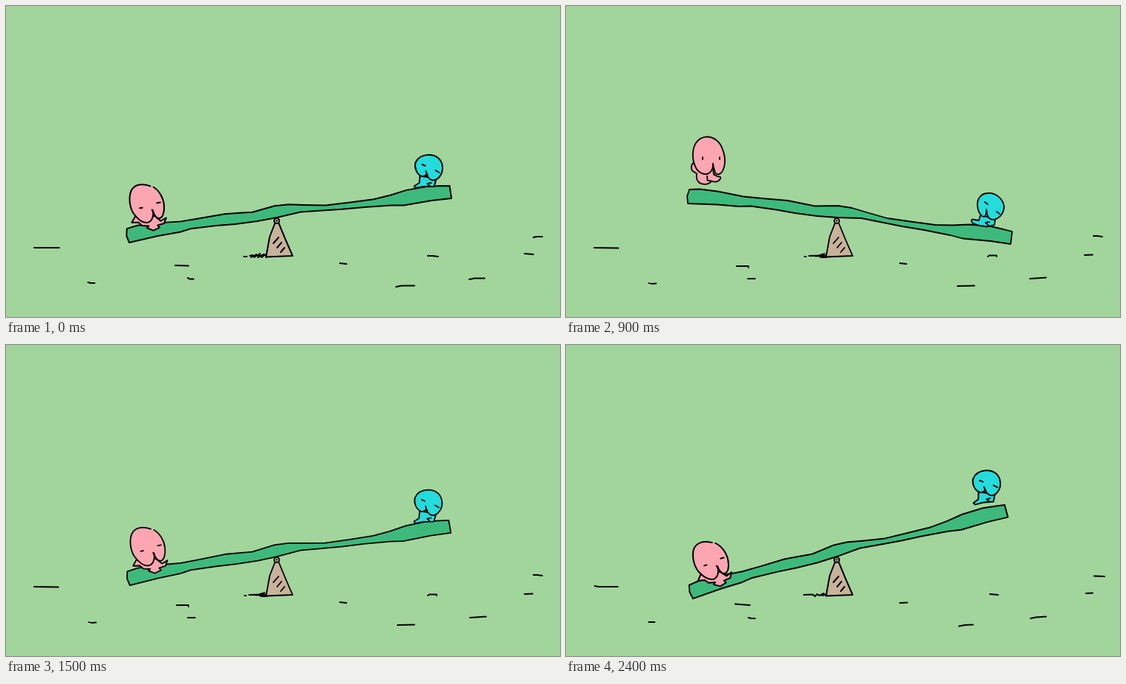
An HTML page with a canvas that plays this animation: 750x422 px, repeating every 2500 ms.

```html
<!DOCTYPE html>
<html lang="en">
<head>
<meta charset="utf-8">
<title>Seesaw</title>
<style>
html, body { margin: 0; width: 100%; height: 100%; overflow: hidden; background: #a2d59c; }
canvas { display: block; }
</style>
</head>
<body>
<canvas id="stage" width="750" height="422"></canvas>
<script>
const ctx = document.getElementById('stage').getContext('2d');
const PINK = '#fba6b0', BLUE = '#24dcdb', GREEN = '#3dba7b', TAN = '#c8b29b';
const STEP = 100, STEPS = 25;

// Plank tilt in degrees; the remaining steps stay at the last value.
const TILT = [-15, -10, -5.4, -2, 0, 0, 0, 0, 0, 0, 0, 0, -2.7, -5.4, -11, -16.5, -21.7];

// Three redrawings of the ground give the hand-drawn wobble.
const GROUND = [
  `M38 328H72M229 352L247 352.5M111 375L115 376H120M246 369L249 370.5H254M452 349L461 350
   M571 339H577L585 340M528 381L536 379.5H553M627 371L634 369.5H648M702 336L714 337M714 314L718 313H726`,
  `M38 328L71 328.5M231 353L247 353V355M112 376L116 377L122 376.5M246 370H256M452 349L461 350
   M571 340L573 338.5H583V340M530 380L553 379.5M628 370L650 368.5M702 338L713 337.5M714 312H719L726 313`,
  `M39 327L44 328H70M229 351.5L249 353M112 376H120M247 370L251 371H256M452 350L462 349.5
   M574 338L585 339M532 381.5L540 380L551 379.5M629 371L636 369.5L650 368.5M704 337L713 336.5M715 313.5L729 314`
];
const SHADOW = [
  'M322 340H326M330 339L334 338L332 341L339 337L336 341L344 336L341 341L349 337L346 341L353 336L352 341',
  'M323 340H325M329 339L346 338.5L338 339.5L350 336L343 340L353 338L345 341H353',
  'M322 339L334 338.5L337 341L340 338L343 340L349 337L347 340L353 338'
];
const WEIGHT = [2, 1.8, 2];

const PLANK = `M165 268L164 258L167 249L181 248.5L205 251.5L240 258.5L265 261L300 264L320 268L337 271.5L368 271
  L387 274L407 280L435 288L470 293L500 297L523 297.5L546 296.5L575 299L588 302L604 306L602 323L575 319L537 315.5
  L520 311L485 304L455 299L425 293L400 288L367 287L340 285L310 281L285 276.5L250 271.5L235 272L205 269.5Z`;

const pinkSit = [
  ['M174 247L167 255.500L176 257L180 262L189 264L186 266L194 271L203 268.500L201 265L210 264L214 257L206 260L199 252Z', PINK],
  ['M204 213C211 219 215 230 214 240C213 250 209 256 205 256C201 256 198 250 198 244C198 251 195 258 189 259C181 260 175 251 171 243C167 232 169 219 174 212C179 206 188 204 200 211', PINK],
  ['M181 238H184.500M205 235H209.500M197 243L198 247']
];
const pinkAir = [
  ['M175 220L172 218.500Q168 223 171 229L177 233Q175 243 183 246.500Q192 249 197 243Q205 246 209 240Q210 236 206 237L200 234L199 226Z', PINK],
  ['M189 183C200 182 209 190 212 200C217 213 215 224 211 231Q206 236 202 232L199 221Q199 228 194 232C187 236 178 231 175 223C170 212 171 199 176 191Q181 184 189 183Z', PINK],
  ['M185 210.500V213.500M208 210.500V213.500M199 219V226M191 236L191.500 242L197 243']
];
const blueSit = [
  ['M561 230L560 240L553 244.500L555 247L566 245H580L583 235Z', BLUE],
  ['M573 202C584 202 591 209 591.500 219C592 228 586 235 580 236.500Q573 237 570 228Q568 232 563 231C556 228 553 219 555 212Q560 202 573 202Z', BLUE],
  ['M564 215L568 217M582 223L587 226M569 224L571 230M576 240L571 241L574 244']
];
const blueDown = [
  ['M561 284L559 291L550 289.500Q547 291 551 295L560 298L570 299.500L580 297L581 289Z', BLUE],
  ['M571 254C582 253 592 262 593 272C593 282 586 289 578 290Q571 290 569 279Q569 286 565 286C557 282 555 268 559 261Q563 254 571 254Z', BLUE],
  ['M567 266L571 269M583 279L587 282M569 276L570 280M573 293L568 294L572 298']
];
const blueAir = [
  ['M557 194L559 200L557 204L553 204L555 209L565 211L577 208L582 203L581 193Z', BLUE],
  ['M559 166Q566 163 576 164.500C585 168 589 175 588.500 182C588 190 583 195 577 198Q570 197 567 188Q566 195 561 195.500C553 192 549 184 550 177Q553 169 559 166Z', BLUE],
  ['M560 179.500L565 181M578 184L583 187M566 186V191M577 202L571 205L575 207']
];

function shape(d, fill) {
  const path = new Path2D(d);
  if (fill) {
    ctx.fillStyle = fill;
    ctx.fill(path);
  }
  ctx.stroke(path);
}

// Moves the point (ox, oy) of a drawing to (x, y) and turns it there.
function place(parts, ox, oy, x, y, deg) {
  ctx.save();
  ctx.translate(x, y);
  ctx.rotate(deg * Math.PI / 180);
  ctx.translate(-ox, -oy);
  for (const part of parts) shape(...part);
  ctx.restore();
}

const hop = (n, top, height, pull) => pull * (n - top) ** 2 - height;

function drawPink(n, tilt) {
  if (n >= 5 && n <= 10) {
    place(pinkAir, 0, 0, 0, hop(n, 7.45, 9, 1.5), 0);
    return;
  }
  const drop = -5.4 - tilt;
  const x = 190.5 + Math.max(0, drop - 9.6) * 0.75;
  place(pinkSit, 191.5, 232, x, 232 + 3.6 * drop, -drop);
}

function drawBlue(n, tilt) {
  const lift = hop(n, 20.2, 15.4, 1.5);
  if (n >= 17 && n < 24) place(blueAir, 0, 0, 0, lift, 0);
  else if (n >= 3 && n <= 12) place(blueDown, 575, 271, 575 + tilt * 0.2, 271 + tilt * 3.5, tilt);
  else {
    const turn = tilt + 15;
    const y = n === 24 ? 181 + lift : 219 + turn * 3.54;
    place(blueSit, 573, 219, 572.5 + turn * 0.45, y, turn * 0.7);
  }
}

function draw(n) {
  const look = n === 24 ? 2 : n % 2;
  const tilt = TILT[Math.min(n, TILT.length - 1)];
  ctx.fillStyle = '#a2d59c';
  ctx.fillRect(0, 0, 750, 422);
  ctx.strokeStyle = '#000';
  ctx.lineWidth = WEIGHT[look];
  ctx.lineCap = ctx.lineJoin = 'round';

  shape(GROUND[look]);
  shape(SHADOW[look]);
  shape('M364 295L357 313L352 340.500L388 339L378 316L369 294Z', TAN);
  shape('M362 322L369 314M367 328L373 321M372 334L377 328');
  shape('M363 291.500a3.500 3.500 0 1 0 7 0a3.500 3.500 0 1 0 -7 0M366 291.500h1', TAN);
  place([[PLANK, GREEN]], 367, 288, 367, 288, tilt);
  drawPink(n, tilt);
  drawBlue(n, tilt);
}

const start = performance.now();
function tick() {
  draw(Math.floor((performance.now() - start) / STEP) % STEPS);
  requestAnimationFrame(tick);
}
tick();
</script>
</body>
</html>
```
